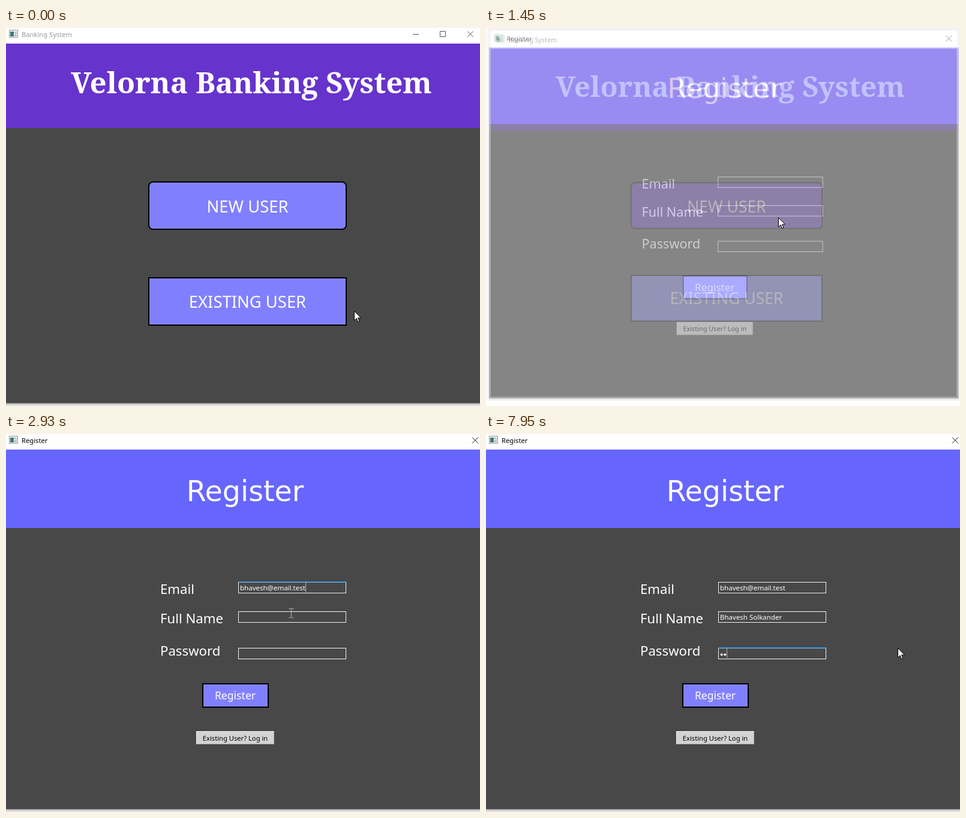
These frames come from a looping animation (790x631 px, 8 s). An HTML page:

```html
<!DOCTYPE html>
<html lang="en">
<head>
<meta charset="utf-8">
<title>Banking System</title>
<style>
  html, body { margin: 0; width: 100%; height: 100%; overflow: hidden; background: #fff; }
  svg { display: block; width: 790px; height: 631px; }
  text { font: 11.2px "Noto Sans", "Open Sans", sans-serif; fill: #fff; white-space: pre; }
  .mid { text-anchor: middle; }
  .brand { font: bold 49.2px "Noto Serif", serif; }
  .big { font-size: 27.4px; }
  .head { font: 47.5px "DejaVu Sans", sans-serif; }
  .label { font-size: 22.2px; }
  .submit { font-size: 17.6px; }
  .typed { font-size: 11.5px; }
  .dark { fill: #000; }
  .btn { fill: #8080ff; stroke: #000; stroke-width: 2; }
  .btn.hover { fill: #6633cc; }
  .field { fill: none; stroke: #f2f2f2; }
  .line { fill: none; stroke: #555; }
</style>
</head>
<body>
<svg viewBox="0 0 790 631">
  <defs>
    <linearGradient id="shade" x2="0" y2="1">
      <stop stop-color="#999"/><stop offset=".35" stop-color="#cfcfcf"/><stop offset="1" stop-color="#e9e9e9"/>
    </linearGradient>
    <g id="frame">
      <path fill="none" stroke="#000" stroke-opacity=".12" stroke-width="6" d="M-4 -5H799V627H-4z"/>
      <path fill="#fff" d="M-4 -5H799V27H-4z"/>
      <path fill="#484848" d="M-4 26H799V626.5H-4z"/>
      <path fill="url(#shade)" d="M-4 626.5H799V631H-4z"/>
      <path fill="#eef2f2" stroke="#8e9898" d="M5.5 3.5h14v12h-14z"/>
      <path fill="#3f7770" d="M7 6h6v8H7z"/>
      <path fill="#b9c8cc" d="M14 6h4v3h-4zM14 10h4v4h-4z"/>
    </g>
  </defs>

  <g id="home">
    <use href="#frame"/>
    <text id="homeTitle" x="26" y="15">Banking System</text>
    <path id="controls" class="line" d="M678 10.5h10M723.5 5.5h9v9h-9zM769 5.5l9.5 9.5m0-9.5l-9.5 9.5"/>
    <path fill="#6633cc" d="M-4 26H799V167H-4z"/>
    <text class="brand mid" x="409" y="109">Velorna Banking System</text>
    <rect class="btn" x="238" y="257" width="329" height="79" rx="7"/>
    <text class="big mid" x="402.5" y="308">NEW USER</text>
    <rect class="btn" x="238" y="417" width="329" height="79"/>
    <text class="big mid" x="402.5" y="467">EXISTING USER</text>
  </g>

  <g id="register">
    <use href="#frame"/>
    <text class="dark" x="26" y="15">Register</text>
    <path class="line" style="stroke:#111" d="M777 5.5l10 10m0-10l-10 10"/>
    <path fill="#6666ff" d="M-4 26H799V157H-4z"/>
    <text class="head mid" x="398.5" y="112">Register</text>
    <g id="fields"></g>
    <rect class="btn" x="328" y="417" width="109" height="39"/>
    <text class="submit mid" x="382" y="443">Register</text>
    <path fill="#d3d3d3" d="M317 496h130v22H317z"/>
    <path class="line" style="stroke:#f4f4f4" d="M317.5 518V496.5H447"/>
    <path class="line" style="stroke:#aaa" d="M318 517.5h128.5V497"/>
    <text class="dark mid" x="382" y="512">Existing User? Log in</text>
    <rect id="accent" x="387" width="180" height="1.5" fill="#0f82dc"/>
    <rect id="caret" width="1" height="16" fill="#b5b5b5"/>
  </g>

  <path id="arrow" fill="#fff" stroke="#000" d="M.5.5V16.2L4.2 12.7 6.5 18.4 8.9 17.4 6.5 11.9H11.5Z"/>
  <path id="beam" fill="none" stroke="#bdbdbd" d="M-4 -7.5h3L0 -6.5 1 -7.5h3M0 -7V7M-4 7.5h3L0 6.5 1 7.5h3"/>
</svg>
<script>
const $ = id => document.getElementById(id);
const LOOP = 8000, STEP = 120, BLINK = 615, KEY = 110, OPEN = 1394;

// Focused at `focus`, typed from `type` until `done` (ms).
const fields = [
  { label: 'Email', base: 267, y: 247, text: 'bhavesh@email.test', focus: 1690, type: 2690, done: 2690, glow: true },
  { label: 'Full Name', base: 316, y: 296, text: 'Bhavesh Solkander', focus: 3050, type: 3910, done: 5860 },
  { label: 'Password', base: 370, y: 357, text: '●●', size: 9, focus: 6960, type: 7950, done: 7950, glow: true }
];
$('fields').innerHTML = fields.map(f => `
  <text class="label" x="257" y="${f.base}">${f.label}</text>
  <rect class="field" x="387.5" y="${f.y + .5}" width="179" height="18"/>
  <text class="typed" x="390" y="${f.y + 14}" style="font-size:${f.size || 11.5}px"></text>`).join('');
document.querySelectorAll('.typed').forEach((el, i) => fields[i].el = el);
const homeButtons = [...$('home').querySelectorAll('.btn')];

// Mouse strokes: start time, steps, end point
const strokes = [[370, 7, 487, 316], [1570, 1, 486, 293], [1690, 1, 466, 248], [1940, 1, 460, 258],
  [2690, 3, 475.5, 299], [3050, 4, 593, 310], [6480, 5, 500, 358], [7210, 2, 686, 357]];

const clamp = (v, lo, hi) => Math.min(hi, Math.max(lo, v));
const ease = u => u * u * (3 - 2 * u);
const inside = (x, y, l, t, w, h) => x >= l && x <= l + w && y >= t && y <= t + h;
const show = (el, on) => el.style.display = on ? '' : 'none';

function mouseAt(t) {
  let x = 580, y = 472;
  for (const [start, steps, endX, endY] of strokes) {
    const k = ease(clamp(Math.floor((t - start) / STEP + 1) / steps, 0, 1));
    x += (endX - x) * k;
    y += (endY - y) * k;
  }
  return [x, y];
}

// A window shrinks slightly towards its centre as it fades.
function fade(el, opacity, shrink) {
  const s = 1 - shrink * (1 - opacity);
  el.setAttribute('opacity', opacity);
  el.setAttribute('transform', `translate(356 294) scale(${s}) translate(-356 -294)`);
  show(el, opacity > 0);
}

function typedText({ text, type, done }, t) {
  if (t < type) return '';
  return text.slice(0, clamp(Math.floor(text.length - (done - t) / KEY), 1, text.length));
}

function drawCaret(t) {
  const f = fields.findLast(f => t >= f.focus);
  show($('accent'), f && f.glow);
  const lastInput = f && (t < f.type ? f.focus : Math.min(t, f.done));
  const on = f && Math.floor((t - lastInput) / BLINK) % 2 === 0;
  show($('caret'), on);
  if (!f) return;
  const width = f.el.textContent ? f.el.getComputedTextLength() : 0;
  $('accent').setAttribute('y', f.y - 1);
  $('caret').setAttribute('x', Math.round(390 + width));
  $('caret').setAttribute('y', f.y + 1);
}

function draw(now) {
  const t = Math.max(0, now) % LOOP;
  const held = t - (t + STEP - 10) % STEP;
  const since = held - OPEN;
  const opened = 1 - (1 - clamp(since / 250, 0, 1)) ** 2;
  fade($('home'), 1 - clamp(since / 100, 0, 1), .059);
  fade($('register'), opened, .042);
  $('homeTitle').style.fill = t < 1210 ? '#999' : '#000';
  show($('controls'), t < 1330);

  for (const f of fields) {
    const text = typedText(f, t);
    if (f.el.textContent !== text) f.el.textContent = text;
  }
  drawCaret(t);

  const [x, y] = mouseAt(t);
  homeButtons.forEach((b, i) => b.classList.toggle('hover', inside(x, y, 237, 257 + i * 160, 331, 80)));
  const overField = opened === 1 && fields.some(f => inside(x, y, 387, f.y, 180, 18));
  show($('arrow'), !overField);
  show($('beam'), overField);
  $(overField ? 'beam' : 'arrow').setAttribute('transform', `translate(${x} ${y})`);
  requestAnimationFrame(draw);
}
requestAnimationFrame(draw);
</script>
</body>
</html>
```
